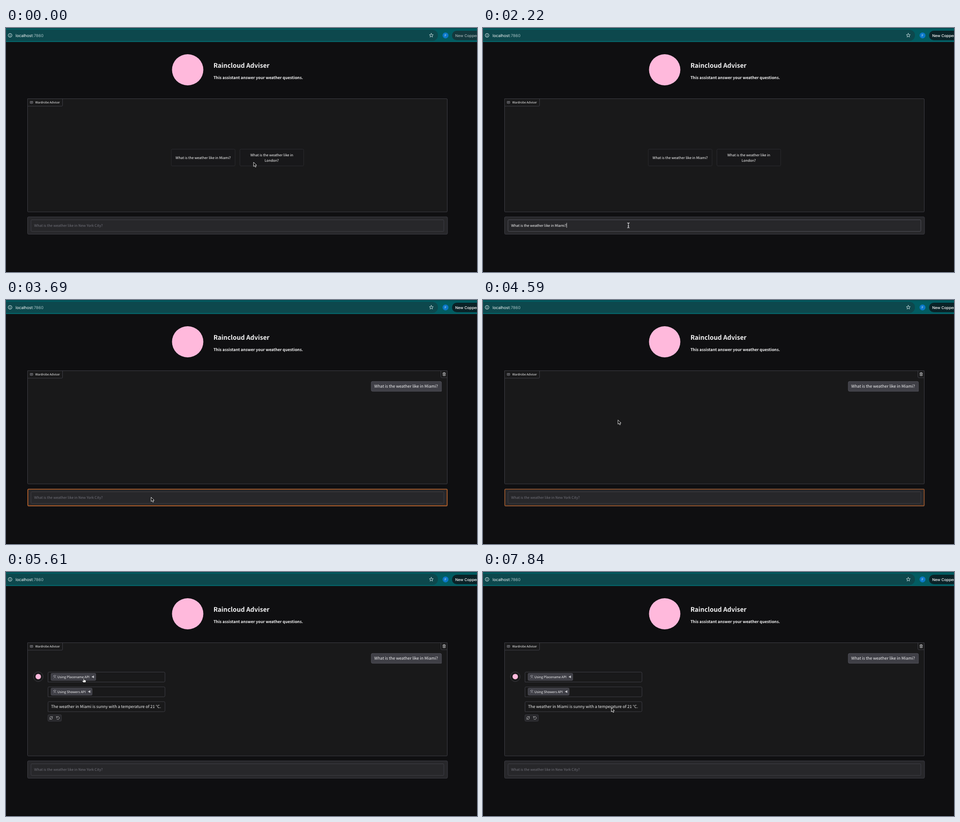
Animation of 1037 by 540 pixels, one loop 8000 ms. Source, as an HTML page:

```html
<!DOCTYPE html>
<html lang="en">
<head>
<meta charset="utf-8">
<title>Raincloud Adviser</title>
<style>
  html, body { margin: 0; width: 100%; height: 100%; overflow: hidden; background: #0f0f11; }
  svg { display: block; width: 100vw; height: 100vh; }
  text {
    font-family: "Noto Sans CJK SC", "Noto Sans CJK JP", "Noto Sans CJK", "Noto Sans", sans-serif;
    font-size: 7.86px; fill: #fff; text-rendering: geometricPrecision; white-space: pre;
  }
  .ui { font-family: Inter, Roboto, sans-serif; }
  .big { font-size: 8.94px; fill: #f4f4f5; }
  .tool { font-size: 7.25px; fill: #f4f4f5; }
  .strong { font-weight: 500; font-size: 7.76px; }
  .bold { font-weight: 700; fill: #f4f4f5; }
  .mid { text-anchor: middle; }
  .hint { fill: #71717a; }
  .panel { fill: #19191a; stroke: #3f3f46; }
  .field { fill: #27272a; stroke: #3f3f46; }
  .chip { fill: #3f3f46; stroke: #52525b; }
  .line { fill: none; stroke: #c4c4c8; stroke-width: .9; stroke-linecap: round; stroke-linejoin: round; }
</style>
</head>
<body>
<svg viewBox="0 0 1037 540" preserveAspectRatio="none">
  <rect width="1037" height="540" fill="#0f0f11"/>
  <rect y="538" width="1037" height="2" fill="#09090a"/>

  <g id="toolbar">
    <rect width="1037" height="31" fill="#025c62"/>
    <rect width="1037" height="1.5" fill="#04484d"/>
    <rect y="30" width="1037" height="1" fill="#0a6c72"/>
    <rect x="-20" y="4" width="971" height="24.5" rx="12" fill="#0d484d"/>
    <circle cx="9" cy="16.3" r="4" class="line" style="stroke:#d7e8ea;stroke-width:1.1"/>
    <path d="M9 16V18.3M9 14.2V14.4" class="line" style="stroke:#d7e8ea;stroke-width:1.1"/>
    <text class="ui" x="21" y="19.6" style="font-size:8.8px">localhost<tspan fill="#a9c3c6">:7860</tspan></text>
    <path id="star" class="line" style="stroke:#d7e8ea"/>
    <circle cx="967.7" cy="16.4" r="6.5" fill="#0b78c9"/>
    <text class="ui mid" x="967.7" y="18.9" style="font-size:7px;fill:#cfe6f7">F</text>
    <rect id="update" x="982" y="6" width="90" height="21" rx="10.5"/>
    <text id="updateText" class="ui" x="989" y="19.6" style="font-size:8.4px;font-weight:500">New Copper</text>
  </g>

  <circle cx="400" cy="92.5" r="34.5" fill="#ffb9dc"/>
  <text class="bold" x="456.7" y="87.8" style="font-size:13.93px">Raincloud Adviser</text>
  <text class="bold" x="456.7" y="112.8" style="font-size:8.7px">This assistant answer your weather questions.</text>

  <rect class="panel" x="47.5" y="156.5" width="924" height="250.5" rx="1.5"/>
  <path class="panel" d="M47.5 156.5H124.5V171Q124.5 173 122.5 173H47.5Z"/>
  <path class="line" style="stroke:#a1a1aa;stroke-width:.7" d="M53.5 162.3H59V166.6H57L56.2 167.7L55.4 166.6H53.5ZM54.8 163.8H57.8M54.8 165.2H57"/>
  <text class="strong" x="64.6" y="167.4" style="font-size:6.57px">Wardrobe Adviser</text>

  <g id="examples">
    <rect x="363.9" y="268.2" width="140.4" height="37" rx="2" fill="#18181a" stroke="#2c2c30"/>
    <rect x="515" y="268.2" width="140.4" height="37" rx="2" fill="#18181a" stroke="#2c2c30"/>
    <text class="strong mid" x="434.2" y="289.8">What is the weather like in Miami?</text>
    <text class="strong mid" x="585.1" y="283.7">What is the weather like in</text>
    <text class="strong mid" x="585.1" y="296.2">London?</text>
  </g>

  <g id="question">
    <path class="panel" d="M957.5 156.5H971.5V172H959.5Q957.5 172 957.5 170Z"/>
    <path class="line" d="M961.6 161.8H967.8M963.6 161.6V160.5H965.8V161.6M962.2 162V167.6H967.2V162M963.9 163.4V166.2M965.5 163.4V166.2"/>
    <path class="chip" d="M807 180.3H956Q958.7 180.3 958.7 183V202H807Q804.2 202 804.2 199.3V183Q804.2 180.3 807 180.3Z"/>
    <text class="big" x="810.8" y="194.2">What is the weather like in Miami?</text>
  </g>

  <g id="avatar">
    <circle class="panel" cx="71" cy="231.7" r="10.7"/>
    <circle cx="71" cy="231.5" r="6" fill="#ffb9dc"/>
  </g>
  <g id="replies"></g>

  <rect class="field" x="47.5" y="418" width="924.5" height="38.3" rx="2"/>
  <rect id="pending" x="48.2" y="418.8" width="923" height="36.6" rx="2" fill="none" stroke="#f97316" stroke-width="1.6"/>
  <rect id="input" class="field" x="55" y="424.5" width="909" height="25.7" rx="2"/>
  <text id="hint" class="hint" x="62">What is the weather like in New York City?</text>
  <text id="typed" class="strong" x="62" y="439.6"></text>
  <path id="caret" stroke="#fff" stroke-width=".8"/>

  <g id="cursor">
    <path id="arrow" d="M-.4 0V9.4L1.8 7.4L3.4 10.9L5.1 10.1L3.6 6.8H6.3Z" fill="#000" stroke="#fff" stroke-width=".9" stroke-linejoin="round"/>
    <path id="ibeam" d="M-2.6 -5.4Q0 -5.4 0 -3.6Q0 -5.4 2.6 -5.4M0 -3.6V3.6M-2.6 5.4Q0 5.4 0 3.6Q0 5.4 2.6 5.4M-1.4 1.3H1.4" fill="none" stroke="#e4e4e7" stroke-width="1.1"/>
    <path id="hand" d="M-.9 .6Q0 -.5 .8 .6V3.6L4.2 4.4Q5.3 4.8 5.1 6L4.4 9.6H-.7L-3.4 6.3Q-3.4 5 -2.2 5.4L-.9 6.4Z" fill="#fff" stroke="#111" stroke-width=".7" stroke-linejoin="round"/>
  </g>
</svg>
<script>
const LOOP = 8000, TICK = 148;
const QUESTION = "What is the weather like in Miami?";
const $ = id => document.getElementById(id);
const show = (id, on) => $(id).style.display = on ? "" : "none";

// Pointer stops: tick, x, y
const PATH = [
  [0, 545.5, 297], [2, 557, 291], [3, 557, 291], [7, 320.3, 437], [26, 319.9, 436.5],
  [31, 297.6, 265.5], [32, 297.6, 265.5], [38, 171, 235], [39, 169, 235.5], [43, 169, 235.5],
  [45, 159.5, 267.5], [47, 159.5, 267.5], [48, 167.5, 263], [49, 169, 265], [50, 169, 265], [53, 283, 300]
];

const TOOLS = [
  { name: "Using Placename API", width: 99, from: 33, open: 41, close: 43,
    detail: ['Parameters: {"location_description":"Miami"}', 'Output: {"lat": 51.1, "lng": -0.1}'] },
  { name: "Using Showers API", width: 91, from: 34, open: 47, close: 51,
    detail: ['Parameters: {"lat":51.1,"lng":-0.1}', 'Output: {"temperature": "21 °C", "description": "Sunny"}'] }
];
const ANSWER_FROM = 35, GROW = 31;

const star = Array.from({ length: 10 }, (_, i) => {
  const a = i * Math.PI / 5, r = i % 2 ? 2 : 4.6;
  return (936.4 + r * Math.sin(a)).toFixed(2) + " " + (16.4 - r * Math.cos(a)).toFixed(2);
});
$("star").setAttribute("d", "M" + star.join("L") + "Z");

const bubble = (y, h) =>
  `<path class="panel" d="M95 ${y}H347.5Q350 ${y} 350 ${y + 2.5}V${y + h - 2.5}Q350 ${y + h} 347.5 ${y + h}H92.5V${y + 2.5}Q92.5 ${y} 95 ${y}Z"/>`;

function toolBox(tool, y, open) {
  const extra = open ? GROW : 0;
  const ax = 99 + tool.width - 7, ay = y + 10.6;
  const mark = open ? `M${ax - 3} ${ay - 2.5}h6l-3 5z` : `M${ax + 2.6} ${ay - 3}v6l-5.4 -3z`;
  const lines = open ? tool.detail.map((s, i) =>
    `<text class="tool" x="104" y="${y + 29 + i * 13}">${s}</text>`).join("") : "";
  return bubble(y, 22 + extra) +
    `<rect class="chip" x="99.2" y="${y + 2.8}" width="${open ? 244 : tool.width - .6}" height="${15.6 + extra}" rx="2"/>` +
    `<path class="line" style="stroke:#a5a5ad" d="M104.7 ${y + 8}l5.6 5.6M104.2 ${y + 9.6}l2.4 -2.6l2 .2M110.2 ${y + 7.6}l-5 6"/>` +
    `<text class="tool" x="113" y="${y + 13.3}">${tool.name}</text>` +
    `<path d="${mark}" fill="#c4c4c8"/>` + lines;
}

function answerBox(y) {
  return bubble(y, 22.2) +
    `<text class="big" x="99.2" y="${y + 14.5}">The weather in Miami is sunny with a temperature of 21 °C.</text>` +
    `<rect class="field" x="92.4" y="${y + 29.1}" width="29.4" height="14" rx="1.5"/>` +
    `<g transform="translate(99.3 ${y + 36.1})"><path class="line" d="M-3 -.4A3 3 0 0 1 2.6 -1.6M2.9 -3.2V-1.3H1M3 .4A3 3 0 0 1 -2.6 1.6M-2.9 3.2V1.3H-1"/></g>` +
    `<g transform="translate(114.2 ${y + 36.1})"><path class="line" d="M-2.8 -1.5A3.2 3.2 0 1 1 -2.8 1.6M-3.2 -3.4V-1.3H-1.1"/></g>`;
}

function replies(k) {
  let y = 221.5, out = "";
  for (const tool of TOOLS) {
    if (k < tool.from) return out;
    const open = k >= tool.open && k < tool.close;
    out += toolBox(tool, y, open);
    y += 32.7 + (open ? GROW : 0);
  }
  return k < ANSWER_FROM ? out : out + answerBox(y);
}

function pointer(k) {
  const i = Math.max(1, PATH.findIndex(p => p[0] >= k));
  const [k0, x0, y0] = PATH[i - 1], [k1, x1, y1] = PATH[i];
  const u = (k - k0) / (k1 - k0), e = u * u * (3 - 2 * u);
  return [x0 + (x1 - x0) * e, y0 + (y1 - y0) * e];
}

function draw(k) {
  const active = k >= 8, sent = k >= 18, editing = active && !sent;
  $("update").setAttribute("fill", active ? "#0a2227" : "#14383d");
  $("updateText").style.fill = active ? "#fff" : "#9fb0b3";

  show("examples", !sent);
  show("question", sent);
  show("avatar", k >= TOOLS[0].from);
  $("replies").innerHTML = replies(k);

  show("pending", k >= 21 && k < ANSWER_FROM);
  $("pending").style.opacity = .6 + .1 * Math.cos((k - 26) * TICK * Math.PI / 1000);

  const typed = editing ? QUESTION.slice(0, Math.round(QUESTION.length * (k - 8) / 7)) : "";
  $("typed").textContent = typed;
  $("input").style.stroke = editing ? "#52525b" : "#3f3f46";
  show("hint", !typed);
  $("hint").setAttribute("y", active ? 439.6 : 440.4);
  show("caret", editing);
  if (editing) {
    const w = typed ? $("typed").getComputedTextLength() : 0;
    $("caret").setAttribute("d", `M${62.5 + w} 431.3V442`);
  }

  const [x, y] = pointer(k);
  $("cursor").setAttribute("transform", `translate(${x} ${y})`);
  const kind = k >= 7 && k < 21 ? "ibeam" : k >= 38 && k < 52 ? "hand" : "arrow";
  for (const id of ["arrow", "ibeam", "hand"]) show(id, id === kind);
}

const start = performance.now();
let last = -1;
function frame() {
  const t = (performance.now() - start) % LOOP;
  const k = Math.min(53, Math.floor((t + 14) / TICK));
  if (k !== last) draw(last = k);
  requestAnimationFrame(frame);
}
frame();
</script>
</body>
</html>
```
